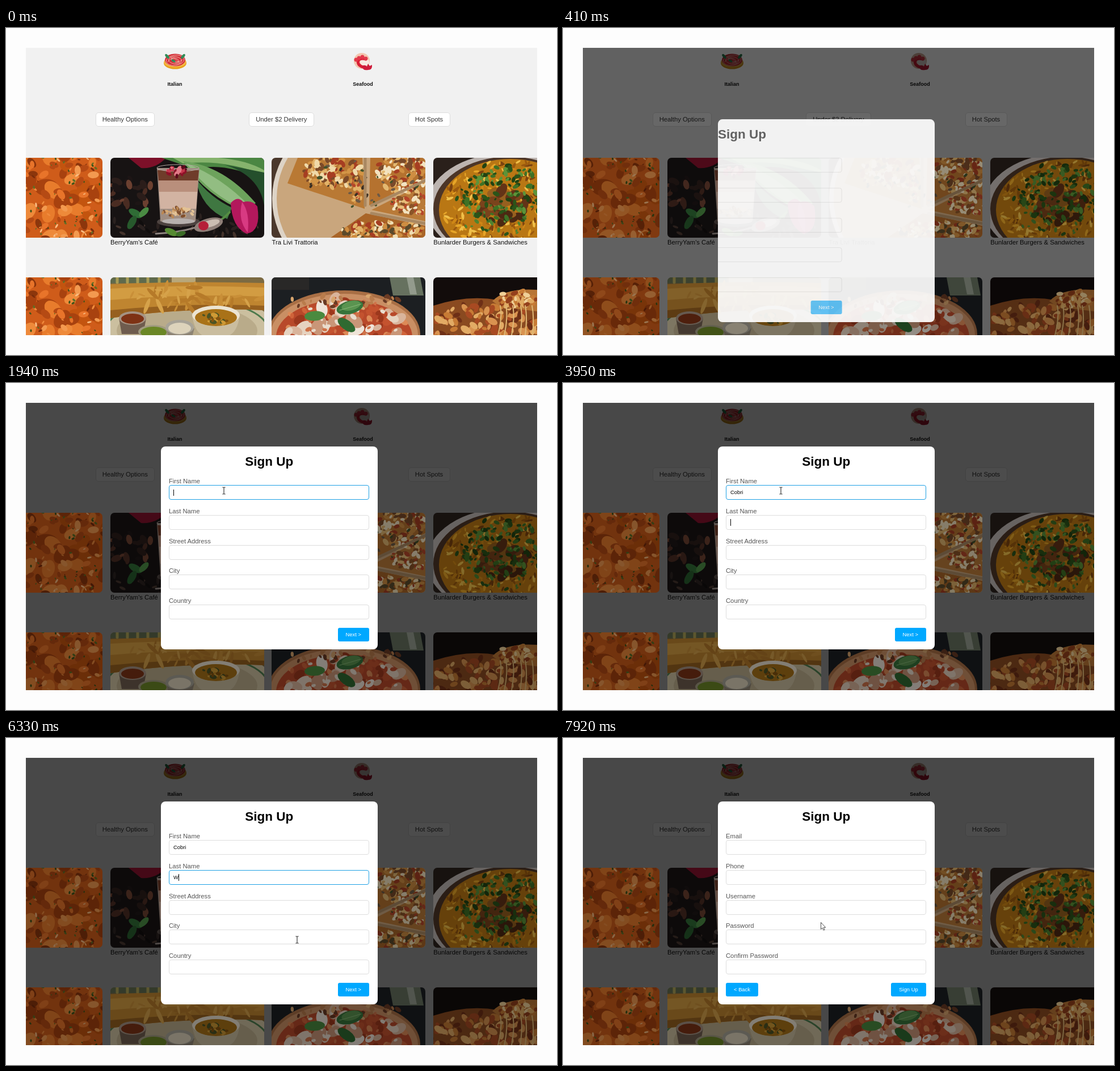
Animation, 971 px wide and 577 px high, one loop 7.99 s. Source, as an HTML page:

```html
<!DOCTYPE html>
<html lang="en">
<head>
<meta charset="utf-8">
<title>Sign up dialog</title>
<style>
html, body { margin: 0; width: 100%; height: 100%; overflow: hidden; background: #fdfdfd; }
body { font: 11.25px/14px "Liberation Sans", Arial, sans-serif; color: #111; }
.app { position: absolute; left: 35px; top: 35px; width: 901px; height: 507px; overflow: hidden; background: #f1f1f1; }
.world { position: absolute; left: -35px; top: -35px; width: 971px; height: 577px; }
.world div, .world svg, .cursor { position: absolute; box-sizing: border-box; white-space: nowrap; }
.cap { font-size: 9px; font-weight: bold; text-align: center; width: 80px; top: 92px; }
.chip { top: 148.5px; height: 25.5px; line-height: 23.5px; text-align: center; color: #333; background: #fff; border: 1px solid #ddd; border-radius: 5px; }
.shade { inset: 0; background: #000; }
.photo { width: 271px; height: 141px; border-radius: 7px; overflow: hidden; }
.photo svg { left: 0; top: 0; }
.modal { left: 273px; top: 112px; width: 381.5px; height: 358px; border-radius: 8px; background: #fff; overflow: hidden; }
.page { inset: 0; }
.page h1 { position: absolute; margin: 0; left: 0; top: 12px; width: 100%; text-align: center; font-size: 22.5px; line-height: 30px; color: #000; }
.label { left: 14px; color: #555; }
.field { left: 14px; width: 353px; height: 26px; padding-left: 7px; line-height: 24px; font-size: 9.37px; border: 1px solid #ddd; border-radius: 4px; color: #000; }
.caret { top: 6.5px; width: 1px; height: 11.5px; background: #000; }
.btn { top: 319.5px; height: 24.5px; line-height: 24.5px; border-radius: 3px; background: #00a8ff; color: #fff; font-size: 9.37px; text-align: center; }
.cursor { left: 0; top: 0; overflow: visible; }
</style>
</head>
<body>
<div class="app"><div class="world" id="world"></div></div>
<svg class="cursor" id="cursor" width="1" height="1">
  <path id="arrow" d="M0 0V12L2.8 9.6 4.7 13.8 6.6 13 4.7 8.9H8.2Z" fill="#fff" stroke="#222" stroke-width=".8"/>
  <path id="ibeam" d="M-2.5-6H-.5L0-5.4 .5-6H2.5M0-5.4V5.4M-2.5 6H-.5L0 5.4 .5 6H2.5" fill="none" stroke="#111"/>
  <path id="hand" d="M-1 0Q0-1.4 1 0V5L6 6.2Q7 6.6 6.7 8L5.6 13H0L-3.8 7.6Q-3.6 6.2-1 8Z" fill="#fff" stroke="#222" stroke-width=".8"/>
</svg>
<script>
const LOOP = 7990;
const $ = id => document.getElementById(id);
const world = $('world');

function add(parent, cls, style = {}, html = '') {
  const el = document.createElement('div');
  el.className = cls;
  for (const k in style) el.style[k] = typeof style[k] === 'number' ? style[k] + 'px' : style[k];
  el.innerHTML = html;
  parent.append(el);
  return el;
}

// ---- drawing helpers
const oval = (x, y, rx, ry, fill, turn = 0, more = '') =>
  `<ellipse cx="${x}" cy="${y}" rx="${rx}" ry="${ry}" fill="${fill}" transform="rotate(${turn} ${x} ${y})" ${more}/>`;
const shape = (d, fill) => `<path d="${d}" fill="${fill}"/>`;
const line = (d, stroke, width) =>
  `<path d="${d}" fill="none" stroke="${stroke}" stroke-width="${width}" stroke-linecap="round"/>`;
const leaf = (x, y, size, turn, fill) => oval(x, y, size, size * .48, fill, turn);
const fillAll = c => shape('M0 0H271V141H0Z', c);
const svg = (w, h, body) => `<svg width="${w}" height="${h}" viewBox="0 0 ${w} ${h}">${body}</svg>`;

function random(seed) {
  return () => (seed = seed * 16807 % 2147483647) / 2147483647;
}

// Ovals spread over an elliptical area
function scatter(seed, n, [cx, cy, rx, ry], size, colors, flat = .6) {
  const rnd = random(seed * 7919);
  let out = '';
  for (let i = 0; i < n; i++) {
    const a = rnd() * 6.283, r = Math.sqrt(rnd()), s = size * (.5 + rnd() * .8);
    out += oval((cx + Math.cos(a) * r * rx).toFixed(1), (cy + Math.sin(a) * r * ry).toFixed(1),
      s.toFixed(1), (s * flat).toFixed(1), colors[i % colors.length], Math.round(rnd() * 180));
  }
  return out;
}

const photos = {
  curry: fillAll('#cf5c1a') +
    scatter(77, 34, [202, 70, 100, 92], 17, ['#e87c2c', '#a8420f', '#ee8a3a', '#c3540f'], .7) +
    scatter(41, 60, [202, 70, 95, 90], 8, ['#f39a50', '#8c360c', '#e8742a', '#b54a14']) +
    scatter(53, 50, [202, 70, 95, 90], 3.5, ['#f9bd83', '#7a2c0a', '#f08a3c'], .4) +
    scatter(19, 50, [202, 70, 92, 85], 2.4, ['#3f5419', '#5f6f25']),

  dessert: fillAll('#171313') +
    scatter(9, 24, [40, 62, 46, 26], 8, ['#4a2c22', '#2b1d1a', '#6b4030', '#1d1515']) +
    scatter(29, 44, [120, 122, 150, 22], 6, ['#2a211f', '#43322b', '#100d0d'], .4) +
    shape('M32 0H98Q80 20 54 18Z', '#7d1029') +
    shape('M90 0H271V40Q200 6 150 20Z', '#4b8642') +
    shape('M110 0H190Q240 4 271 22V30Q200 2 128 10Z', '#86b36d') +
    shape('M150 36Q176 70 214 88L206 108Q160 90 150 36Z', '#3f7741') +
    shape('M128 6Q200 14 256 80L238 94Q170 70 128 6Z', '#6da35c') +
    shape('M134 10Q196 34 246 86L238 92Q176 66 134 10Z', '#92bd82') +
    shape('M200 12Q262 30 271 84V26Z', '#244f2c') +
    line('M210 96Q190 118 176 112', '#568d43', 4) +
    shape('M212 80Q224 66 234 78Q250 74 259 86Q266 130 240 134Q214 122 212 80Z', '#b3185c') +
    shape('M232 78Q246 96 242 132Q224 110 232 78Z', '#d83a82') +
    oval(120, 113, 38, 9, '#4d4340') +
    shape('M82 18H157L150 112Q120 122 88 112Z', '#9f8d82') +
    shape('M83 22H156L154 42H85Z', '#6f3c2a') +
    shape('M85 40H154L153 62H86Z', '#b98f7c') + shape('M86 60H153L151 90H88Z', '#d2b3a2') +
    scatter(13, 36, [119, 96, 27, 8], 4, ['#bd8852', '#d8ab76', '#80502f', '#e3c295']) +
    oval(120, 112, 29, 5, '#b7b0ad') + oval(119, 18, 37, 6, 'none', 0, 'stroke="#b7aaa5"') +
    scatter(23, 24, [118, 24, 18, 9], 5, ['#8d1028', '#c5364c', '#5c0a1b', '#e07a86']) +
    line('M80 134Q120 132 150 123', '#8f8580', 3) + oval(173, 118, 26, 11, '#8f7f78', -16) +
    oval(176, 116, 17, 6, '#cbbdb2', -16) + oval(164, 120, 9, 8, '#b51f38') +
    leaf(44, 98, 13, 30, '#2f6c35') + leaf(59, 96, 11, -45, '#4a8b43') + leaf(38, 114, 13, -60, '#27592c') +
    leaf(107, 131, 12, 25, '#568b32') + leaf(124, 134, 9, -15, '#3b6c27'),

  slices: fillAll('#4b382c') +
    oval(150, 72, 149, 149, '#ddd3c6') + oval(150, 72, 141, 141, '#c9a67d') +
    shape('M46 0H160L164 90L28 45Z', '#b97934') + shape('M174 0H271V36L172 84Z', '#b5722f') +
    shape('M176 92L271 44V112Z', '#b97a38') + shape('M104 141L166 98L271 120V141Z', '#a96528') +
    scatter(5, 120, [108, 26, 52, 27], 6, ['#e2b268', '#a63e22', '#f0d9a8', '#7c4a28', '#d39546']) +
    scatter(14, 24, [146, 58, 14, 26], 5, ['#e2b268', '#b5472a', '#d39546']) +
    scatter(6, 130, [230, 26, 44, 38], 6, ['#e3b871', '#a63e22', '#f3e3c0', '#7a4a2a', '#cf8e42']) +
    scatter(7, 64, [244, 80, 32, 26], 5, ['#e7bd78', '#b5472a', '#f3e3c0', '#8a5428']) +
    scatter(8, 110, [196, 128, 74, 17], 5.5, ['#e2b268', '#a63e22', '#f0deb4', '#5b4a2b', '#cf8e42']) +
    scatter(15, 34, [165, 46, 100, 42], 4, ['#44522a', '#3b3024', '#6d5a46']) +
    line('M165 0V84M176 84L271 40M176 98L271 116', '#a98862', 5),

  rice: fillAll('#2a201b') +
    oval(130, 86, 142, 94, '#bcb4b0') + oval(134, 90, 134, 92, '#4c3527') + oval(136, 92, 126, 90, '#b97714') +
    scatter(31, 300, [136, 88, 120, 84], 6, ['#e6a528', '#9c5a0f', '#f0c04a', '#cf8716', '#7d430f'], .35) +
    scatter(33, 34, [124, 84, 46, 30], 11, ['#633317', '#7a431c', '#4c2812', '#96601f']) +
    scatter(37, 130, [120, 62, 82, 52], 5, ['#3f7125', '#5d9338', '#2b5419', '#214312']) +
    scatter(38, 30, [140, 110, 90, 28], 4, ['#4f8430', '#2b5419']),

  dosa: fillAll('#7b6a42') +
    shape('M0 0H104V10H0Z', '#5f6a4c') + line('M12 0V9M30 0V9M48 0V9M66 0V9M86 0V9', '#a89c55', 5) +
    shape('M108 0H150V10H108Z', '#b8a77a') +
    oval(135, 92, 156, 64, '#cbbf9f') + oval(135, 92, 142, 54, 'none', 0, 'stroke="#4d7a4c" stroke-width="3"') +
    oval(135, 94, 124, 46, '#b9ab8a') +
    shape('M0 12Q130 6 271 10V58Q140 52 0 72Z', '#bf8530') +
    shape('M0 20Q130 12 271 18V34Q140 28 0 40Z', '#d29c42') +
    shape('M0 58Q140 44 271 50V58Q140 52 0 72Z', '#96601f') +
    scatter(44, 40, [135, 36, 135, 20], 12, ['#c98f38', '#b67a29', '#d6a24a'], .25) +
    shape('M15 72H63L58 100H20Z', '#6f5c4e') + oval(39, 72, 24, 12, '#a59282') + oval(39, 73, 20, 9, '#7e3215') +
    oval(76, 96, 27, 12, '#a19b80') + oval(76, 97, 23, 10, '#6b8726') +
    shape('M98 90H148L142 112H104Z', '#8d8373') + oval(122, 88, 25, 13, '#a8a397') + oval(122, 90, 20, 10, '#ddd3bb') +
    shape('M144 66H228Q224 98 206 104H166Q148 98 144 66Z', '#cabd9f') +
    oval(186, 67, 42, 17, '#ece4d2') + oval(186, 71, 37, 15, '#a97218') +
    scatter(51, 18, [186, 72, 27, 9], 5, ['#85540f', '#cf9a35', '#4c5424']),

  basil: fillAll('#1c1f22') +
    shape('M0 0H66V22H0Z', '#292827') + shape('M208 0H262L268 32H214Z', '#66715f') + shape('M238 0H250L256 30H244Z', '#939b8d') +
    oval(128, 100, 134, 77, '#a96f45') + oval(128, 101, 130, 72, '#c98f64') + oval(128, 105, 120, 66, '#b8492a') +
    scatter(61, 90, [128, 102, 120, 64], 9, ['#d0643a', '#9c381d', '#dd8a57', '#c4532f'], .7) +
    scatter(67, 38, [128, 92, 104, 54], 13, ['#e6d3c0', '#d9b49b', '#efe4d8', '#c99678'], .65) +
    scatter(69, 60, [128, 94, 112, 58], 5, ['#b8492a', '#e9dccd', '#cf7248']) +
    scatter(71, 30, [128, 42, 100, 14], 5, ['#6a3b24', '#d8a66f', '#b97c4c']) +
    leaf(138, 53, 24, -14, '#37733a') + leaf(140, 50, 17, -14, '#5a9450') +
    leaf(76, 68, 18, -4, '#4a8a3f') + leaf(132, 84, 18, 36, '#2f6a31') +
    line('M120 58Q138 53 158 47', '#8bb97a', 1),

  pull: fillAll('#120c0b') +
    shape('M0 50Q60 30 114 40Q190 50 271 44V141H0Z', '#8a4a20') +
    scatter(81, 150, [96, 88, 106, 44], 8, ['#c77b35', '#6e2f16', '#e2ab65', '#a84a22', '#d99350']) +
    shape('M104 42Q126 18 183 22V60L118 52Z', '#b87535') +
    scatter(87, 50, [150, 38, 36, 14], 6, ['#e0aa62', '#94401c', '#efcf97', '#c77b35']) +
    [118, 128, 140, 154, 162, 174].map((x, i) => line(`M${x} 50Q${x + 4} 70 ${x - 4 + i} 102`, '#dfb876', 2)).join('')
};

// ---- page behind the dialog
const icons = add(world, '', { left: 0, top: 0, zIndex: 2 });
icons.innerHTML = svg(971, 110,
  oval(298, 62, 20, 10.5, '#e8a01c') + oval(298, 60, 19.5, 9.5, '#f4b944') + oval(298, 56.5, 18, 11, '#d32f38') +
  [0, 1, 2].map(i => oval(298, 57, 16 - i * 4.5, 9 - i * 2.6, 'none', i * 14 - 8, 'stroke="#f3b9ae" stroke-width=".9"')).join('') +
  line('M285 60Q294 46 306 62M290 51Q300 66 311 56', '#f3b9ae', .9) +
  leaf(284, 50, 5, 50, '#2f8b57') + leaf(312, 50, 5, -50, '#2f8b57') + leaf(295, 58, 4, 30, '#2f8b57') +
  oval(627, 58, 14, 14, '#f3c6af') + oval(632, 60, 8, 7, '#f8eae2') +
  line('M634 55Q625 52 621 57Q618 65 629 69', '#d91f35', 5) +
  [[617, 56], [622, 53], [628, 51], [634, 54]].map(([x, y]) => oval(x, y, 3.5, 3.5, '#e2384a')).join('') +
  shape('M627 67Q633 64 636 68L638 63 641 67L645 65Q646 74 638 74Q629 76 627 67Z', '#cf1c3b'));

[['Italian', 257.5], ['Seafood', 589]].forEach(([s, x]) => add(world, 'cap', { left: x }, s));
[['Healthy Options', 157.5, 104.5], ['Under $2 Delivery', 427.5, 115.5], ['Hot Spots', 708.5, 74]]
  .forEach(([s, x, w]) => add(world, 'chip', { left: x, width: w }, s));
["BerryYam's Café", 'Tra Livi Trattoria', 'Bunlarder Burgers &amp; Sandwiches']
  .forEach((s, i) => add(world, '', { left: 184 + i * 284.6, top: 371 }, s));
const shade = add(world, 'shade');

const gallery = add(world, '', { left: 0, top: 0 });
[['curry', 'dessert', 'slices', 'rice'], ['curry', 'dosa', 'basil', 'pull']].forEach((row, r) =>
  row.forEach((name, c) => add(gallery, 'photo',
    { left: -101 + c * 284.6, top: 228.5 + r * 211 }, svg(271, 141, photos[name]))));

// ---- dialog
const modal = add(world, 'modal', { zIndex: 3 });

function makePage(labels, buttons) {
  const el = add(modal, 'page', {}, '<h1>Sign Up</h1>');
  const fields = labels.map((s, i) => {
    const y = 68 + i * 52.75;
    add(el, 'label', { top: y - 14 }, s);
    return add(el, 'field', { top: y });
  });
  buttons.forEach(([s, x, w]) => add(el, 'btn', { left: x, width: w }, s));
  return { el, fields };
}
const first = makePage(['First Name', 'Last Name', 'Street Address', 'City', 'Country'], [['Next &gt;', 311.5, 55.5]]);
const second = makePage(['Email', 'Phone', 'Username', 'Password', 'Confirm Password'],
  [['&lt; Back', 14, 57], ['Sign Up', 305, 62]]);

const inputs = first.fields.slice(0, 2).map(box => {
  const text = document.createElement('span');
  box.append(text);
  return { box, text, caret: add(box, 'caret') };
});

// ---- motion
const clamp = v => Math.max(0, Math.min(1, v));
const held = (t, start, step) => t < start ? t : start + Math.floor((t - start) / step + .001) * step;

function ease(x) {
  x = clamp(x);
  if (x === 0 || x === 1) return x;
  const bez = (a, b, u) => 3 * a * u * (1 - u) ** 2 + 3 * b * u * u * (1 - u) + u ** 3;
  let lo = 0, hi = 1;
  for (let i = 0; i < 24; i++) {
    const mid = (lo + hi) / 2;
    if (bez(.25, .25, mid) < x) lo = mid; else hi = mid;
  }
  return bez(.1, 1, lo);
}

const OPEN = 238, FOCUS = 1690, TAB = 3950, NEXT = 7160;
const TRAVEL = 381.5;
const NAME = 'Cobri';
const nameKeys = [3020, 3220, 3330, 3440, 3550];
const surnameKey = 4850;
const path = [
  [1070, 885, 178], [1300, 690, 169], [1540, 460, 183], [1740, 384, 190],
  [5910, 384, 190], [5980, 391, 182], [6120, 428, 232], [6330, 513, 356], [6540, 580, 420],
  [6680, 602, 437], [6960, 610, 443], [7300, 610, 443], [7500, 612, 446], [7680, 540, 384], [7920, 432, 310]
];

function pointer(t) {
  const i = path.findIndex(p => p[0] > t);
  if (i < 0) return path[path.length - 1].slice(1);
  const [a, b] = [path[i - 1], path[i]];
  const k = (t - a[0]) / (b[0] - a[0]);
  return [a[1] + (b[1] - a[1]) * k, a[2] + (b[2] - a[2]) * k];
}

function setFocus(box, k) {
  const mix = (a, b) => Math.round(a + (b - a) * k);
  box.style.borderColor = `rgb(${mix(221, 30)},${mix(221, 160)},${mix(221, 228)})`;
}

function showCursor(t) {
  const cursor = $('cursor');
  cursor.style.display = t < 1070 ? 'none' : '';
  if (t < 1070) return;
  const [x, y] = pointer(held(t, t < 5910 ? 1070 : 5910, t < 5910 ? 67.2 : 70));
  cursor.style.transform = `translate(${x}px, ${y}px)`;
  const inField = t < NEXT && x > 287 && x < 640 && y > 180 && y < 417 && (y - 180) % 52.75 < 26;
  const onButton = x > 578 && x < 640 && y > 431 && y < 456;
  const kind = inField ? 'ibeam' : onButton ? 'hand' : 'arrow';
  for (const id of ['arrow', 'ibeam', 'hand']) $(id).style.display = id === kind ? '' : 'none';
}

function slide(page, visible, k, from) {
  page.el.style.display = visible ? '' : 'none';
  page.el.style.opacity = k;
  page.el.style.transform = `translateX(${from * (1 - k)}px)`;
}

function showForm(t) {
  const count = nameKeys.filter(k => k <= t).length;
  const typed = [NAME.slice(0, count), t >= surnameKey ? 'W' : ''];
  const active = t < FOCUS ? -1 : t < TAB ? 0 : 1;
  const lastKey = Math.max(...[FOCUS, ...nameKeys, TAB, surnameKey].filter(k => k <= t), 0);
  const blinkOn = Math.floor((t - lastKey) / 530) % 2 === 0;
  inputs.forEach(({ box, text, caret }, i) => {
    if (text.textContent !== typed[i]) text.textContent = typed[i];
    caret.style.left = 7 + text.offsetWidth + 'px';
    caret.style.display = active === i && blinkOn ? '' : 'none';
  });
  const moved = ease((held(t, TAB, 70) - TAB) / 300);
  setFocus(inputs[0].box, ease((held(t, 1740, 67) - FOCUS) / 250) * (1 - moved));
  setFocus(inputs[1].box, moved);
}

function draw(t) {
  const s = held(t, 270, 67.14);
  const open = t < 270 ? 0 : ease((s - OPEN) / 300);
  shade.style.opacity = .7 * open;
  gallery.style.filter = `brightness(${1 - .45 * open})`;
  icons.style.filter = `brightness(${1 - .25 * open})`;
  modal.style.display = t < 270 ? 'none' : '';
  modal.style.opacity = Math.sqrt(open);
  modal.style.transform = `translateY(${330 * (1 - open)}px)`;
  slide(first, t < NEXT, ease((s - OPEN) / 470), -TRAVEL);
  slide(second, t >= NEXT, ease((held(t, NEXT, 68) - NEXT + 30) / 470), TRAVEL);
  showForm(t);
  showCursor(t);
}

const begin = performance.now();
function tick() {
  draw((performance.now() - begin) % LOOP);
  requestAnimationFrame(tick);
}
tick();
</script>
</body>
</html>
```
